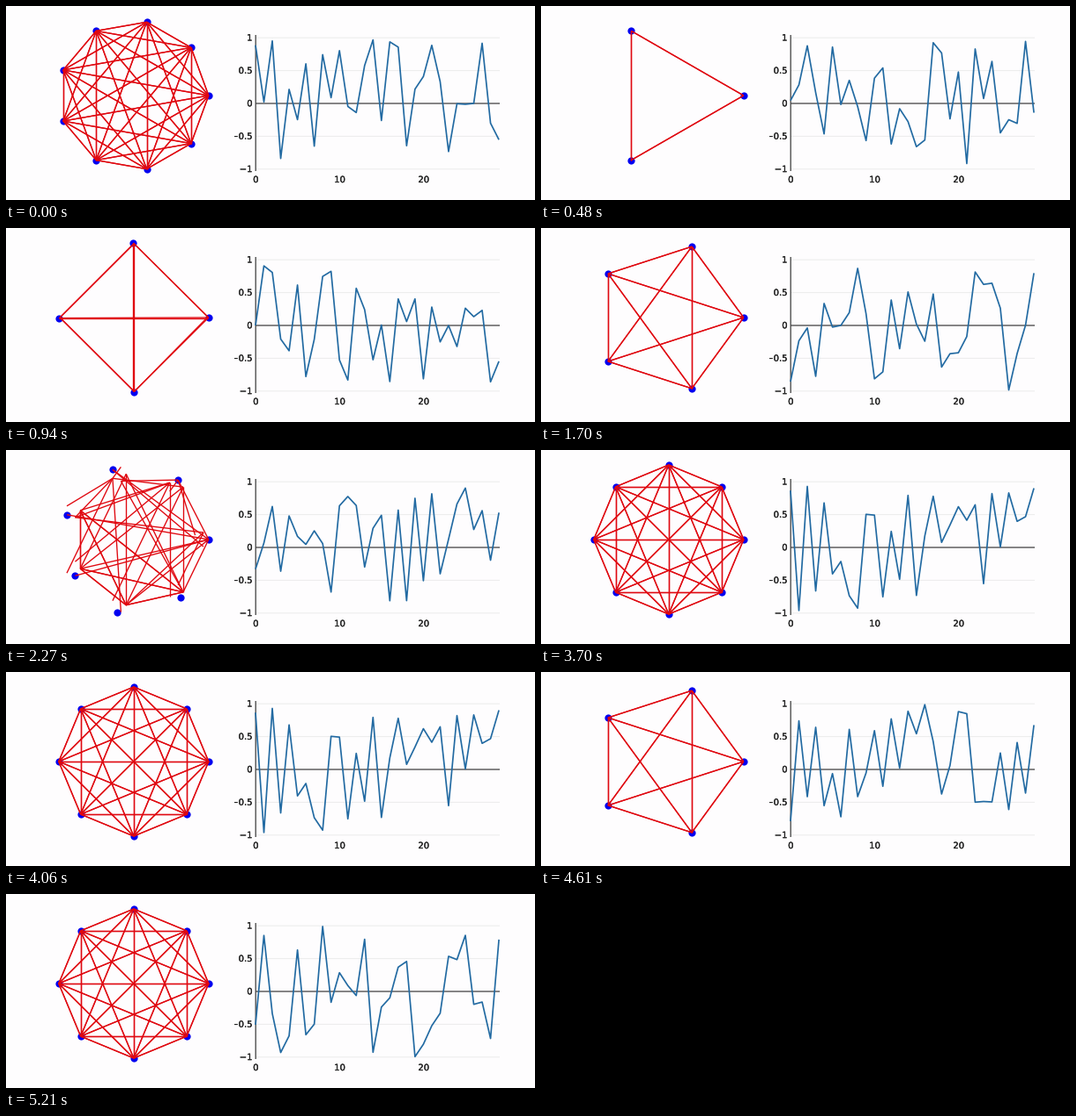
Recreate the animation shown at these times as a matplotlib script. Size 600x221 px, loop 5240 ms.

```python
from itertools import product

import matplotlib.pyplot as plt
import numpy as np
from matplotlib.animation import FuncAnimation
from matplotlib.collections import LineCollection
from matplotlib.patches import Rectangle
from matplotlib.patheffects import withStroke

W, H, DPI = 600, 221, 100
LOOP, STEP = 5240, 20
PERIOD, FIRST, MORPH = 680, 60, 240
PX = 72 / DPI
PAPER, INK = "#fefdfe", "#222222"

SIZES = [9, 3, 4, 5, 7, 9, 8, 5, 8]
POINTS = 30
rng = np.random.default_rng(4)
series = rng.uniform(-1, 1, (len(SIZES), POINTS))


def ring(n):
    a = 2 * np.pi * np.arange(n) / n
    return np.column_stack([144.8 + 85 * np.cos(a), 102 - 85 * np.sin(a)])


def mesh(n):
    """All ordered node pairs; unused slots collapse onto the first node."""
    p = ring(n)
    segs = np.tile(p[0], (max(SIZES) ** 2, 2, 1))
    segs[:n * n] = [(p[i], p[j]) for i, j in product(range(n), repeat=2)]
    return segs


rings = [ring(n) for n in SIZES]
meshes = [mesh(n) for n in SIZES]


def ease(p):
    """Cubic in-out."""
    return 4 * p ** 3 if p < .5 else 1 - 4 * (1 - p) ** 3


def phase(t):
    """Previous state, current state and eased progress between them."""
    if t < FIRST:
        return 0, 0, 1
    k, since = divmod(t - FIRST, PERIOD)
    return int(k), int(k) + 1, ease(min(since / MORPH, 1))


def mix(a, b, e):
    return a + (b - a) * e


def sx(x):
    return 283 + 9.52 * x


def sy(y):
    return 111 - 74.8 * y


fig = plt.figure(figsize=(W / DPI, H / DPI), dpi=DPI, facecolor=PAPER)
ax = fig.add_axes([0, 0, 1, 1])
ax.set(xlim=(0, W), ylim=(H, 0))
ax.axis("off")


def rule(x, y, color, width, z):
    ax.plot(x, y, color=color, lw=width * PX, zorder=z, snap=False,
            solid_capstyle="butt")


def label(x, y, text, ha):
    ax.text(x, y, text, ha=ha, va="center", family="DejaVu Sans",
            size=10 * PX, color=INK,
            path_effects=[withStroke(linewidth=.3 * PX, foreground=INK)])


# chart frame
for y in (1, .5, 0, -.5, -1):
    if y:
        rule([283, 560], [sy(y)] * 2, "#ececec", 1, 1)
    label(279.5, sy(y) + .3, f"{y:g}".replace("-", "\u2212"), "right")
for x in (0, 10, 20):
    label(sx(x) + .3, 198, str(x), "center")
rule([283, 560], [111, 111], "#444444", 1.3, 2)
rule([283.2, 283.2], [33, 188], "#444444", 1.3, 2)
# the chart's left edge cuts off the widest label
ax.add_patch(Rectangle((250, 140), 9, 18, fc=PAPER, ec="none", zorder=6))

curve, = ax.plot([], [], color="#226a a2".replace(" ", ""), lw=1.7 * PX,
                 zorder=4, solid_joinstyle="round", solid_capstyle="butt")
dots, = ax.plot([], [], "o", color="#0000f0", ms=8.2 * PX, mew=0, zorder=3)
edges = LineCollection([], colors="#e00810", linewidths=1.35 * PX,
                       capstyle="butt", zorder=4)
ax.add_collection(edges)
xs = sx(np.arange(POINTS))


def draw(i):
    a, b, e = phase(i * STEP + STEP / 2)

    nodes = rings[b].copy()
    shared = min(SIZES[a], SIZES[b])
    nodes[:shared] = mix(rings[a][:shared], nodes[:shared], e)
    dots.set_data(nodes[:, 0], nodes[:, 1])
    edges.set_segments(mix(meshes[a], meshes[b], e))
    curve.set_data(xs, sy(mix(series[a], series[b], e)))
    return dots, edges, curve


anim = FuncAnimation(fig, draw, frames=LOOP // STEP, interval=STEP,
                     repeat=True, repeat_delay=0, blit=False)
plt.show()
```
